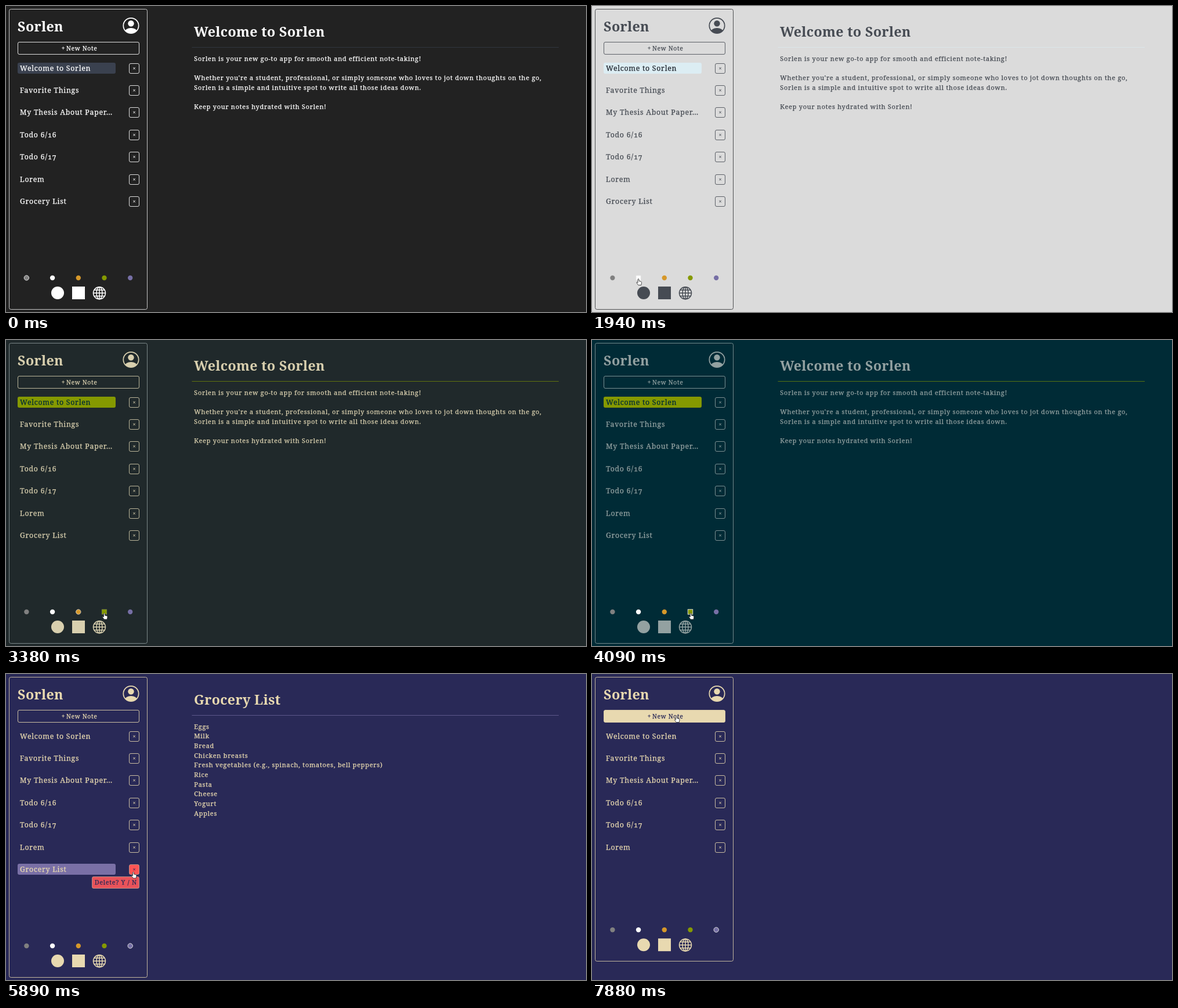
Write an HTML page that moves like this. It is 1000x529 px and loops after 8000 ms.

```html
<!DOCTYPE html>
<html lang="en">
<head>
<meta charset="utf-8">
<title>Sorlen notes</title>
<style>
  html, body { margin: 0; height: 100%; overflow: hidden; background: #222; }
  svg { display: block; width: 100vw; height: 100vh; }
  text {
    font: 11px "Noto Serif", serif; letter-spacing: .71px; white-space: pre;
    font-variant-numeric: oldstyle-nums;
    fill: var(--ink, var(--fg)); stroke: var(--ink, var(--fg)); stroke-width: .25px;
  }
  .title { font-size: 23.3px; font-weight: 600; letter-spacing: .3px; stroke: none; }
  .item { font-size: 12.3px; letter-spacing: .74px; }
  .middle { text-anchor: middle; }
  .cross { font: 9px "Noto Sans", sans-serif; letter-spacing: 0; text-anchor: middle; stroke: none; }
  .solid { fill: var(--fg); }
  .line { fill: none; stroke: var(--fg); }
  rect.line { stroke-opacity: .85; }
  .on .item { --ink: var(--onText); }
  .on .mark { fill: var(--accent); }
  .mark { fill: none; }
  .rule { stroke: var(--accent); opacity: .65; }
  .panel { fill: none; stroke: var(--edge); stroke-opacity: .8; }
  .hot rect { fill: #ff5555; }
  .hot text, .ask text, .filled text { --ink: var(--bg); }
  .ask rect { fill: #e9535a; stroke: var(--fg); }
  .hot rect, .ask rect { stroke-opacity: .5; }
  .filled rect { fill: var(--fg); }
</style>
</head>
<body>
<svg id="stage" viewBox="0 0 1000 529" preserveAspectRatio="none">
  <rect width="1000" height="529" fill="var(--bg)"/>
  <rect id="panel" class="panel" x="5.5" y="5.5" width="238" height="519" rx="3"/>
  <text class="title" x="20" y="44">Sorlen</text>
  <g id="avatar">
    <clipPath id="face"><circle cx="215.5" cy="34" r="13"/></clipPath>
    <circle class="line" cx="215.5" cy="34" r="13.2" stroke-width="1.7"/>
    <circle class="solid" cx="215.5" cy="30.3" r="5.2"/>
    <ellipse class="solid" cx="215.5" cy="45" rx="10.8" ry="7" clip-path="url(#face)"/>
  </g>
  <g id="newNote">
    <rect class="line" x="20.5" y="62.5" width="209" height="21" rx="2.5"/>
    <text class="middle" x="126.6" y="76.8" style="font-size:10.3px">+<tspan dx="-1.5"> New Note</tspan></text>
  </g>
  <g id="items"></g>
  <g id="footer">
    <g id="dots"></g>
    <circle class="solid" cx="89" cy="496" r="11"/>
    <rect class="solid" x="114" y="485" width="22" height="22"/>
    <g class="line" stroke-width="1.5">
      <circle cx="161" cy="496.3" r="10.5"/>
      <ellipse cx="161" cy="496.3" rx="5" ry="10.5"/>
      <path d="M161 486v21M150.5 496.3h21M152 491h18M152 501.6h18"/>
    </g>
  </g>
  <g id="welcome"></g>
  <g id="grocery"></g>
  <path id="rule" class="rule" d="M320.5 71.5H953"/>
  <g id="ask" class="ask">
    <rect x="148.5" y="350.5" width="81" height="20" rx="2.5"/>
    <text class="middle" x="189.3" y="364.3" style="font-size:10.8px">Delete? Y / N</text>
  </g>
  <path id="cursor" fill="#fff" stroke="#222" stroke-width=".8" stroke-linejoin="round"
    d="M-1 .8Q0-.6 1 .8V4L4.6 5Q5.8 5.4 5.5 7L4.8 11H-.2L-3 7.2Q-3.4 5.6-2 6L-1 7Z"/>
</svg>
<script>
const LOOP = 8000, FADE = 400;
const SELECT = 4930, ASK = 5790, REMOVE = 6680;
const $ = id => document.getElementById(id);

// start, background, text, accent, text on accent, panel edge
const themes = [
  [0, '#222222', '#ffffff', '#3a414f', '#ffffff', '#eeeeee'],
  [1726, '#ffffff', '#222831', '#dcedf3', '#222831', '#2b2d30'],
  [2598, '#282828', '#ebdbb2', '#d79921', '#282828', '#ebdbb2'],
  [3316, '#002b36', '#93a1a1', '#859900', '#002b36', '#93a1a1'],
  [4250, '#292957', '#e8d9b0', '#7a70a6', '#e8d9b0', '#e8d9b0']
];
const dotColors = ['#808080', '#ffffff', '#d6982a', '#859900', '#766fa5'];
const names = ['Welcome to Sorlen', 'Favorite Things', 'My Thesis About Paper…',
  'Todo 6/16', 'Todo 6/17', 'Lorem', 'Grocery List'];
const notes = {
  welcome: ['Sorlen is your new go-to app for smooth and efficient note-taking!', '',
    "Whether you're a student, professional, or simply someone who loves to jot down thoughts on the go,",
    'Sorlen is a simple and intuitive spot to write all those ideas down.', '',
    'Keep your notes hydrated with Sorlen!'],
  grocery: ['Eggs', 'Milk', 'Bread', 'Chicken breasts',
    'Fresh vegetables (e.g., spinach, tomatoes, bell peppers)',
    'Rice', 'Pasta', 'Cheese', 'Yogurt', 'Apples']
};
// time, x, y of the pointer tip
const path = [
  [790, 300, 540], [1150, 170, 500], [1580, 80, 471.5], [2270, 80, 471.5],
  [2500, 126, 471.5], [3090, 126, 471.5], [3260, 169.5, 472], [4080, 169.5, 472],
  [4220, 214, 472], [4320, 214, 472], [4620, 79, 338], [4980, 79, 338],
  [5500, 219.5, 342], [5920, 219.5, 342], [6350, 200, 359], [6800, 200, 359],
  [7700, 145.5, 72.5], [LOOP, 145.5, 72.5]
];

$('items').innerHTML = names.map((name, i) => `
  <g transform="translate(0 ${Math.round(107.6 + 38.42 * i)})">
    <rect class="mark" x="20" y="-10" width="169" height="19" rx="3"/>
    <text class="item" x="24" y="3.6">${name}</text>
    <g class="remove"><rect class="line" x="212.5" y="-8.5" width="17" height="17" rx="2.5"/>
    <text class="cross" x="221" y="3.2">×</text></g>
  </g>`).join('');
$('dots').innerHTML = dotColors.map((color, i) =>
  `<rect x="${31.2 + 44.7 * i}" y="465.8" width="8.4" height="8.4" fill="${color}" stroke="#ddd"/>`).join('');
for (const [id, lines] of Object.entries(notes)) {
  const title = id === 'welcome' ? names[0] : names[6];
  $(id).innerHTML = `<text class="title" x="324" y="53">${title}</text>` + lines.map((line, i) =>
    `<text x="324.3" y="${(94.8 + 16.67 * i).toFixed(2)}">${line}</text>`).join('');
}
const items = [...$('items').children], dots = [...$('dots').children];
const deleteButton = items[6].querySelector('.remove');

// CSS "ease": cubic-bezier(.25, .1, .25, 1)
function ease(x) {
  if (x >= 1) return 1;
  let low = 0, high = 1, u;
  for (let i = 0; i < 20; i++) {
    u = (low + high) / 2;
    const bx = .75 * u * (1 - u) + u ** 3;
    if (bx < x) low = u; else high = u;
  }
  return .3 * u * (1 - u) ** 2 + 3 * u * u * (1 - u) + u ** 3;
}
function mix(a, b, p) {
  const channel = (c, i) => parseInt(c.slice(i, i + 2), 16);
  return `rgb(${[1, 3, 5].map(i => Math.round(channel(a, i) + (channel(b, i) - channel(a, i)) * p))})`;
}
function pointer(t) {
  const k = path.findIndex(stop => stop[0] > t);
  if (k < 1) return [-50, -50];
  const [t0, x0, y0] = path[k - 1], [t1, x1, y1] = path[k];
  const u = (t - t0) / (t1 - t0), s = u * u * (3 - 2 * u);
  return [x0 + (x1 - x0) * s, y0 + (y1 - y0) * s];
}
const show = (node, on) => node.style.display = on ? '' : 'none';

function render(t) {
  const now = themes.findLastIndex(theme => t >= theme[0]);
  const before = Math.max(0, now - 1);
  const p = now ? ease((t - themes[now][0]) / FADE) : 1;
  const [, bg, fg, accent, onText, edge] = themes[now];
  const vars = { bg: mix(themes[before][1], bg, p), fg: mix(themes[before][2], fg, p), accent, onText, edge };
  for (const key in vars) $('stage').style.setProperty('--' + key, vars[key]);

  const [x, y] = pointer(t);
  $('cursor').setAttribute('transform', `translate(${x} ${y})`);
  dots.forEach((dot, i) => {
    const over = Math.abs(x - 35.4 - 44.7 * i) < 5 && Math.abs(y - 470) < 5;
    dot.setAttribute('rx', over ? 0 : 4.2);
    dot.setAttribute('stroke-opacity', i === now ? p : i === before ? 1 - p : 0);
  });

  const removed = t >= REMOVE, selected = removed ? -1 : t >= SELECT ? 6 : 0;
  items.forEach((item, i) => item.classList.toggle('on', i === selected));
  show(items[6], !removed);
  show($('welcome'), selected === 0);
  show($('grocery'), selected === 6);
  show($('rule'), !removed);
  show($('ask'), t >= ASK && !removed);
  deleteButton.classList.toggle('hot', x > 212 && x < 230 && y > 329 && y < 347);
  $('newNote').classList.toggle('filled', x > 20 && x < 230 && y > 62 && y < 84);
  $('panel').setAttribute('height', removed ? 491 : 519);
  $('footer').setAttribute('transform', `translate(0 ${removed ? -27.8 : 0})`);
}

const start = performance.now();
function tick() {
  render((performance.now() - start) % LOOP);
  requestAnimationFrame(tick);
}
tick();
</script>
</body>
</html>
```
